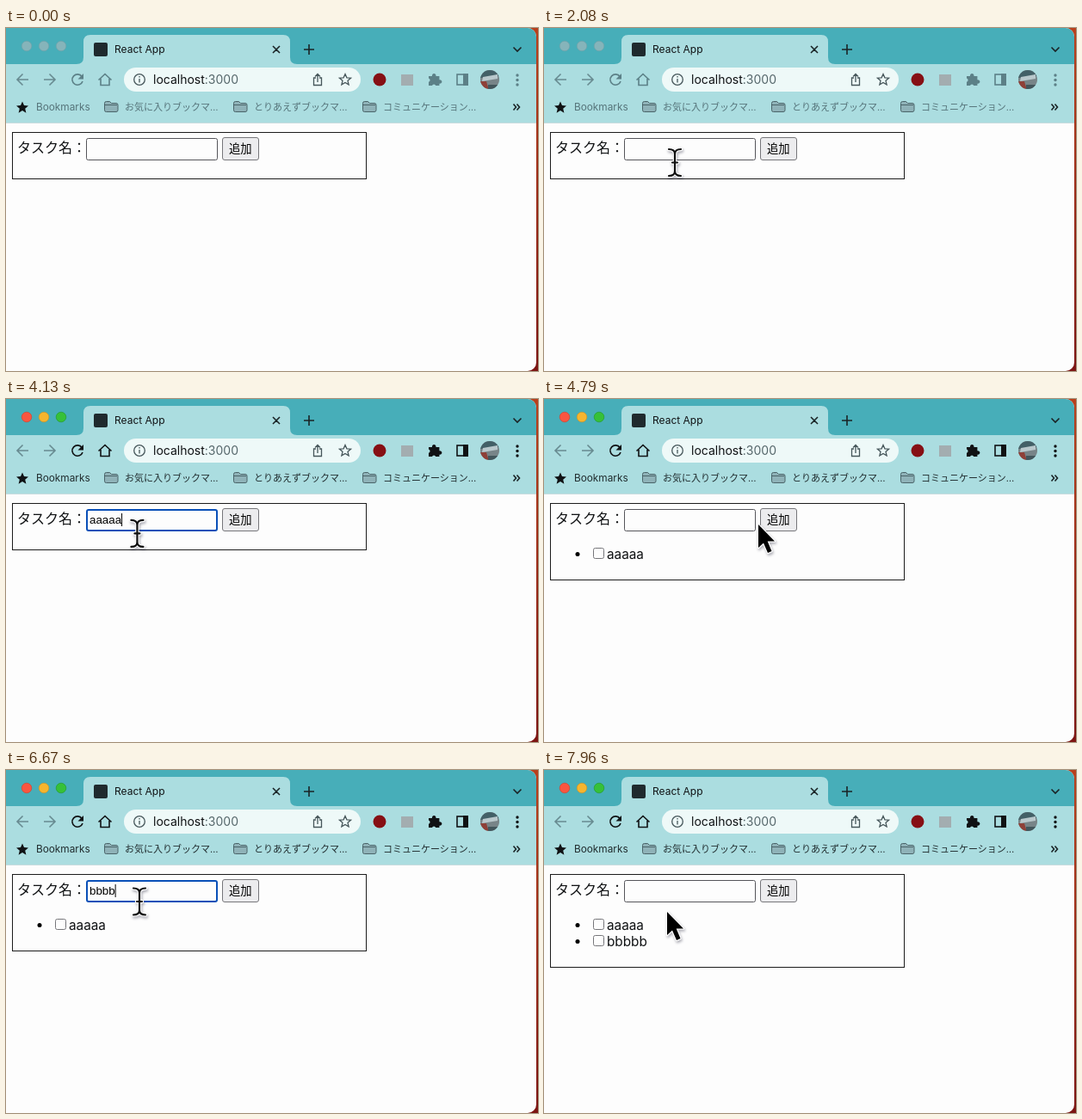
Recreate the animation shown at these times as an HTML page. Size 618x399 px, loop 8 s.

```html
<!DOCTYPE html>
<html lang="ja">
<head>
<meta charset="utf-8">
<title>Task list</title>
<style>
  html, body { margin: 0; width: 100%; height: 100%; overflow: hidden; background: #8c2016; }
  svg { display: block; }
  text { font-family: Inter, "Noto Sans CJK JP", "Noto Sans CJK", sans-serif; fill: #101214; white-space: pre; }
  .form { font: 13.33px "Liberation Sans", "Noto Sans CJK JP", "Noto Sans CJK", sans-serif; fill: #000; }
  .line { fill: none; stroke: #1a2426; stroke-width: 1.6; }
  .dim { stroke: #688b91; }
  .tool { stroke: #101214; }
  .solid { fill: #101214; }
  .mark { font-size: 11px; fill: #202c2e; }
  .inactive .tool { stroke: #5c8087; }
  .inactive .solid { fill: #5c8087; }
  .inactive .mark { fill: #56747a; }
  .inactive .light { fill: #86b4ba; stroke: #70a3aa; }
  #cursor { filter: drop-shadow(1px 2px 1.5px rgba(60, 60, 80, .4)); }
</style>
</head>
<body>
<svg id="stage" width="618" height="399" viewBox="0 0 618 399">
  <defs>
    <clipPath id="window"><rect x="-20" width="636" height="399" rx="10"/></clipPath>
    <clipPath id="face"><circle cx="562" cy="60" r="11"/></clipPath>
    <linearGradient id="desktop" x2="0" y2="1">
      <stop stop-color="#b8401c"/><stop offset="1" stop-color="#7c1412"/>
    </linearGradient>
    <g id="folder">
      <path d="M.5 2.5q0-2 2-2h4l2 2h5.500q2 0 2 2v6q0 2-2 2h-11.500q-2 0-2-2z" fill="#8fb2b8" stroke="#4a6469"/>
      <path d="M1 4.500h14" stroke="#4a6469"/>
    </g>
  </defs>

  <rect width="618" height="399" fill="url(#desktop)"/>
  <g clip-path="url(#window)">
    <rect width="618" height="399" fill="#fdfdfd"/>
    <rect width="618" height="42" fill="#47aeb9"/>
    <rect y="42" width="618" height="68" fill="#abdde0"/>
    <path d="M0 110.500h618" stroke="#c8dcde"/>
    <path d="M82 42q8 0 8-8V16q0-8 8-8H322q8 0 8 8V34q0 8 8 8z" fill="#abdde0"/>

    <g stroke-width=".7">
      <circle class="light" cx="24" cy="21" r="5.800" fill="#fa5540" stroke="#d44530"/>
      <circle class="light" cx="44" cy="21" r="5.800" fill="#f7b52e" stroke="#cf9525"/>
      <circle class="light" cx="64" cy="21" r="5.800" fill="#36c138" stroke="#289c2c"/>
    </g>
    <rect x="102" y="17" width="16" height="16" rx="2" fill="#1f2a2e"/>
    <text x="126" y="29" font-size="12">React App</text>
    <path class="line" d="M310 21l8 8m0-8l-8 8M346 25h12m-6-6v12M589.500 22.500l4.500 4.500 4.500-4.500"/>

    <path class="line dim" d="M26 60H13m6.500-6.500L13 60l6.500 6.500M44 60h13m-6.500-6.500L57 60l-6.500 6.500"/>
    <path class="line tool" d="M88.200 56.500A6.200 6.200 0 1 0 89 62"/>
    <path class="solid" d="M90 53v6.500h-6.500z"/>
    <path class="line tool" d="M107.500 60.500L115 53.500l7.500 7M110 59v7.500h10V59"/>

    <rect x="137" y="46" width="275" height="28" rx="14" fill="#eef9f8"/>
    <g class="line" style="stroke:#46565a;stroke-width:1.300">
      <circle cx="155" cy="60" r="6.300"/>
      <path d="M155 59v4.500m0-7.500v1.600"/>
      <path d="M360 58h-2.500v8.500h9V58H364m-2 5v-9.500m-3 3l3-3 3 3"/>
      <path d="M394 53.500l1.900 4.300 4.700.4-3.600 3.100 1.100 4.600-4.100-2.500-4.100 2.500 1.100-4.600-3.600-3.100 4.700-.4z"/>
    </g>
    <text x="171" y="65" font-size="14">localhost<tspan fill="#56676b">:3000</tspan></text>

    <circle cx="434" cy="60" r="7.500" fill="#860f14"/>
    <rect x="459" y="54" width="14" height="13" fill="#a3adb0"/>
    <path class="solid" d="M491 56h4a2.300 2.300 0 1 1 4.400 0h4v4.300a2.300 2.300 0 1 1 0 4.400V67h-4.200a2.200 2.200 0 0 0-4.200 0h-4v-4.200a2.200 2.200 0 0 0 0-4.200z"/>
    <rect class="line tool" x="524" y="54" width="12" height="12"/>
    <path class="solid" d="M531 53h6v14h-6z"/>
    <g clip-path="url(#face)">
      <path d="M550 48h24v24h-24z" fill="#788488"/>
      <path d="M550 48h24v8l-24 2z" fill="#436067"/>
      <path d="M554 57l17-3v5l-18 3z" fill="#b9c8cc"/>
      <path d="M550 62h8l3 10h-11z" fill="#8e4038"/>
      <path d="M560 66h14v6h-14z" fill="#43565c"/>
    </g>
    <g class="solid">
      <circle cx="594" cy="55" r="1.700"/><circle cx="594" cy="60.500" r="1.700"/><circle cx="594" cy="66" r="1.700"/>
    </g>

    <path fill="#101214" d="M19 85.500l2 4.600 5 .4-3.800 3.300 1.200 4.900-4.400-2.600-4.400 2.600 1.200-4.900-3.800-3.300 5-.4z"/>
    <text class="mark" x="35" y="96" style="font-size:11.800px">Bookmarks</text>
    <use href="#folder" x="114" y="85"/><text class="mark" x="138" y="96">お気に入りブックマ…</text>
    <use href="#folder" x="264" y="85"/><text class="mark" x="288" y="96">とりあえずブックマ…</text>
    <use href="#folder" x="414" y="85"/><text class="mark" x="438" y="96">コミュニケーション…</text>
    <path class="line" d="M589.500 88.500l3 3.500-3 3.500m4-7l3 3.500-3 3.500"/>

    <rect id="panel" x="7.500" y="121.500" width="411" height="54" fill="none" stroke="#1c1c1c"/>
    <text x="13" y="144.600" font-size="16">タスク名：</text>
    <rect id="field" rx="2" fill="#fdfdfd"/>
    <text id="value" class="form" x="97" y="145"></text>
    <path id="caret" d="M0 133v15" stroke="#000"/>
    <rect id="button" x="251.500" y="127.500" width="42" height="26" rx="2.500" stroke="#76767a"/>
    <text class="form" x="259" y="145">追加</text>
    <g id="items"></g>
  </g>

  <g id="cursor" stroke="#fdfdfd" stroke-linejoin="round">
    <path id="arrow" d="M0 0V27L6 21.500 11 33 15.500 31 10.700 19.500H19z" fill="#000" stroke-width="2.500" paint-order="stroke"/>
    <g id="beam" fill="none" stroke-linecap="round">
      <use href="#beamShape" stroke-width="4.500"/>
      <use href="#beamShape" stroke-width="2.200" stroke="#101010"/>
    </g>
  </g>
  <defs>
    <path id="beamShape" d="M-7-15.500Q0-15.500 0-10Q0-15.500 7-15.500M-7 15.500Q0 15.500 0 10Q0 15.500 7 15.500M0-10V10M-3 0H3"/>
  </defs>
</svg>
<script>
const LOOP = 8000;
const ACTIVATE = 2300;
const ENTER = 500;
const KEY_GAP = 150;
const tasks = [
  { letter: 'a', focus: 2600, type: 3430, press: 4510, add: 4640 },
  { letter: 'b', focus: 5400, type: 6160, press: 7190, add: 7340 }
];
// time, x, y
const path = [
  [ENTER, 290, 399], [1150, 157, 237], [1450, 157, 237], [2000, 152, 156.5],
  [4120, 152, 156.5], [4430, 266, 143], [4660, 266, 143], [4790, 249, 146],
  [5150, 155, 153], [6720, 155, 153], [7050, 260, 144], [7420, 260, 144],
  [7800, 143, 165], [LOOP, 143, 165]
];
const idleField = { x: 93.5, y: 128.5, width: 152, height: 25, stroke: '#55555a', 'stroke-width': 1 };
const focusField = { x: 94, y: 129, width: 151, height: 24, stroke: '#0a50b8', 'stroke-width': 2 };

const $ = id => document.getElementById(id);
const show = (el, on) => el.setAttribute('visibility', on ? 'inherit' : 'hidden');
const set = (el, attrs) => { for (const key in attrs) el.setAttribute(key, attrs[key]); };

$('items').innerHTML = tasks.map((task, i) => `
  <g transform="translate(0 ${i * 19})">
    <circle cx="39" cy="180.500" r="2.500"/>
    <rect x="57.500" y="173.500" width="12" height="12" rx="2" fill="#fdfdfd" stroke="#76767a"/>
    <text x="73" y="186" font-size="15.300">${task.letter.repeat(5)}</text>
  </g>`).join('');

function position(t) {
  const i = Math.max(1, path.findIndex(p => p[0] > t));
  const [t0, x0, y0] = path[i - 1], [t1, x1, y1] = path[i];
  const u = Math.max(0, (t - t0) / (t1 - t0));
  const e = u * u * (3 - 2 * u);
  return [x0 + (x1 - x0) * e, y0 + (y1 - y0) * e];
}

function draw(t) {
  $('stage').classList.toggle('inactive', t < ACTIVATE);

  const task = tasks.find(k => t >= k.focus && t < k.add);
  const typed = task ? Math.max(0, Math.min(5, Math.floor((t - task.type) / KEY_GAP) + 1)) : 0;
  $('value').textContent = task ? task.letter.repeat(typed) : '';
  set($('field'), task ? focusField : idleField);

  const lastInput = task && (typed ? task.type + (typed - 1) * KEY_GAP : task.focus);
  show($('caret'), task && (t - lastInput) % 1000 < 500);
  set($('caret'), { transform: `translate(${97.5 + typed * 7.41} 0)` });
  set($('button'), { fill: task && t >= task.press ? '#d6d6de' : '#ececee' });

  const added = tasks.filter(k => t >= k.add).length;
  [...$('items').children].forEach((item, i) => show(item, i < added));
  set($('panel'), { height: [54, 89, 108][added] });

  const [x, y] = position(t);
  const overField = x > 93 && x < 246 && y > 128 && y < 160;
  show($('cursor'), t >= ENTER);
  show($('beam'), overField);
  show($('arrow'), !overField);
  set($('cursor'), { transform: `translate(${x} ${y})` });
}

function tick() {
  draw(performance.now() % LOOP);
  requestAnimationFrame(tick);
}
tick();
</script>
</body>
</html>
```
